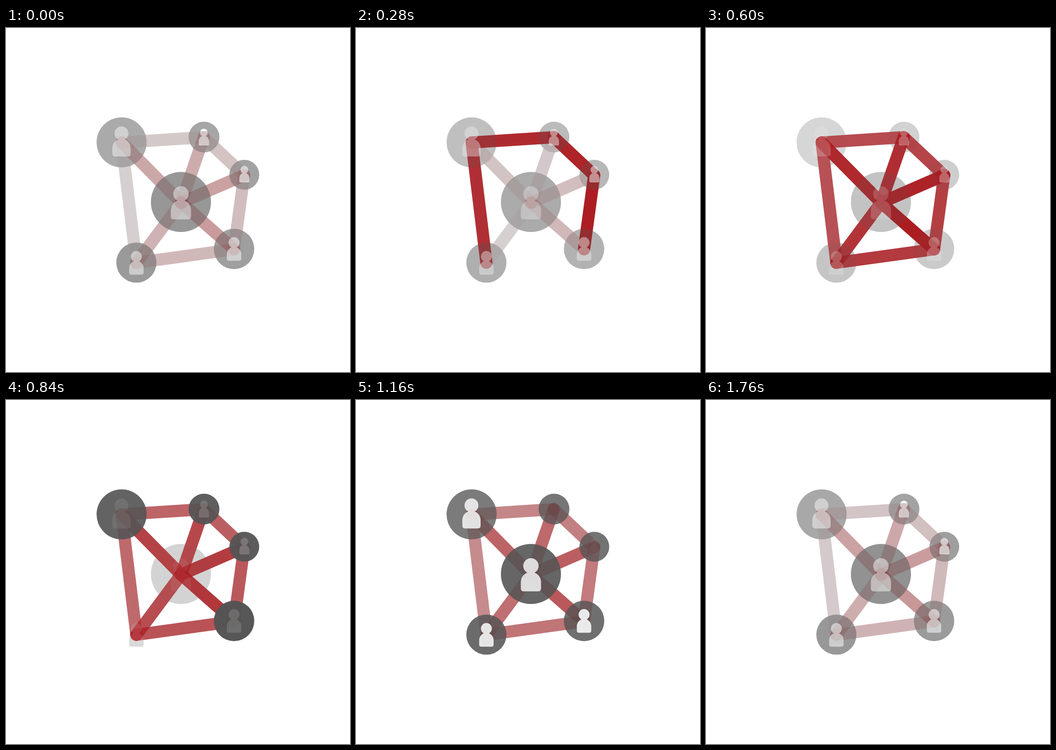
Animation of 715 by 715 pixels, one loop 1800 ms. Source, as an HTML page:

```html
<!DOCTYPE html>
<html>
<head>
<meta charset="utf-8">
<style>
  html, body { margin: 0; width: 100%; height: 100%; overflow: hidden; background: #fff; }
  svg { display: block; width: 100vw; height: 100vh; }
</style>
</head>
<body>
<svg id="stage" viewBox="0 0 715 715"></svg>
<script>
const LOOP = 1800, TICK = 40;
const FIRST = 80, STEP = 1200 / 22;   // restart times of the staggered fades
const MIN_ALPHA = 0.012;
const MATTE = '#d8d8d8', RED = '#ac1b20', DARK = '#545454', PALE = '#eeeeee';

// joint: line end; disc: centre and radius; head: centre; size: half body width
const nodes = {
  topLeft:     { joint: [240.5, 238], disc: [240.3, 237.7, 52],  head: [240, 219],       size: 19 },
  topRight:    { joint: [411, 227],   disc: [411.5, 226.7, 32],  head: [411.3, 217.6],   size: 10.6 },
  right:       { joint: [495, 306],   disc: [495.3, 305, 31],    head: [495.4, 294.6],   size: 10.5 },
  bottomRight: { joint: [474, 460],   disc: [474, 459.2, 42],    head: [474, 446],       size: 15 },
  bottomLeft:  { joint: [271, 488],   disc: [271, 487.6, 41.7],  head: [271, 475],       size: 15 },
  centre:      { joint: [364, 363],   disc: [363.6, 361.7, 62.4], head: [363.6, 344.8],  size: 21 }
};
const { topLeft, topRight, right, bottomRight, bottomLeft, centre } = nodes;

const stage = document.getElementById('stage');

function add(parent, tag, attrs = {}) {
  const el = document.createElementNS('http://www.w3.org/2000/svg', tag);
  for (const key in attrs) el.setAttribute(key, attrs[key]);
  return parent.appendChild(el);
}

const matteLayer = add(stage, 'g');
const colourLayer = add(stage, 'g');

const line = (a, b) => (parent, colour) => add(parent, 'path', {
  d: `M${a.joint}L${b.joint}`, stroke: colour, 'stroke-width': 25.4, 'stroke-linecap': 'round'
});

const disc = ({ disc: [cx, cy, r] }) => (parent, colour) =>
  add(parent, 'circle', { cx, cy, r, fill: colour });

const person = ({ head: [x, y], size }) => (parent, colour) => {
  const g = add(parent, 'g', {
    transform: `translate(${x} ${y}) scale(${size})`, fill: colour
  });
  add(g, 'circle', { r: 0.76 });
  add(g, 'path', {
    d: 'M-1 1.6A1 1 0 0 1 1 1.6V2.22Q1 2.52 .7 2.52H-.7Q-1 2.52 -1 2.22Z'
  });
  return g;
};

const parts = [
  [RED, [
    line(bottomLeft, topLeft), line(topLeft, topRight), line(topRight, right),
    line(right, bottomRight), line(bottomRight, bottomLeft),
    ...[bottomLeft, topRight, topLeft, right, bottomRight].map(n => line(centre, n))
  ]],
  [DARK, [topLeft, topRight, right, bottomRight, bottomLeft, centre].map(disc)],
  [PALE, [centre, topLeft, bottomLeft, bottomRight, topRight, right].map(person)]
].flatMap(([colour, shapes]) => shapes.map(draw => ({
  matte: draw(matteLayer, MATTE),
  paint: draw(colourLayer, colour)
})));

// brief white flash on the upper part of one head
const flash = add(stage, 'path', {
  d: 'M403.9 214.6A8 8 0 0 1 418.7 214.6Q411.3 213.4 403.9 214.6Z', fill: '#fff'
});

function render(ms) {
  const t = Math.floor((ms % LOOP) / TICK) * TICK;
  parts.forEach(({ matte, paint }, i) => {
    const age = (t - FIRST - i * STEP + 2 * LOOP) % LOOP;
    const alpha = 1 - age / LOOP;
    const shown = alpha > MIN_ALPHA;
    matte.setAttribute('visibility', shown ? 'visible' : 'hidden');
    paint.setAttribute('opacity', shown ? alpha : 0);
  });
  flash.setAttribute('visibility', t >= LOOP - TICK || t < TICK ? 'visible' : 'hidden');
}

let start;
function frame(now) {
  start ??= now;
  render(now - start);
  requestAnimationFrame(frame);
}
render(0);
requestAnimationFrame(frame);
</script>
</body>
</html>
```
